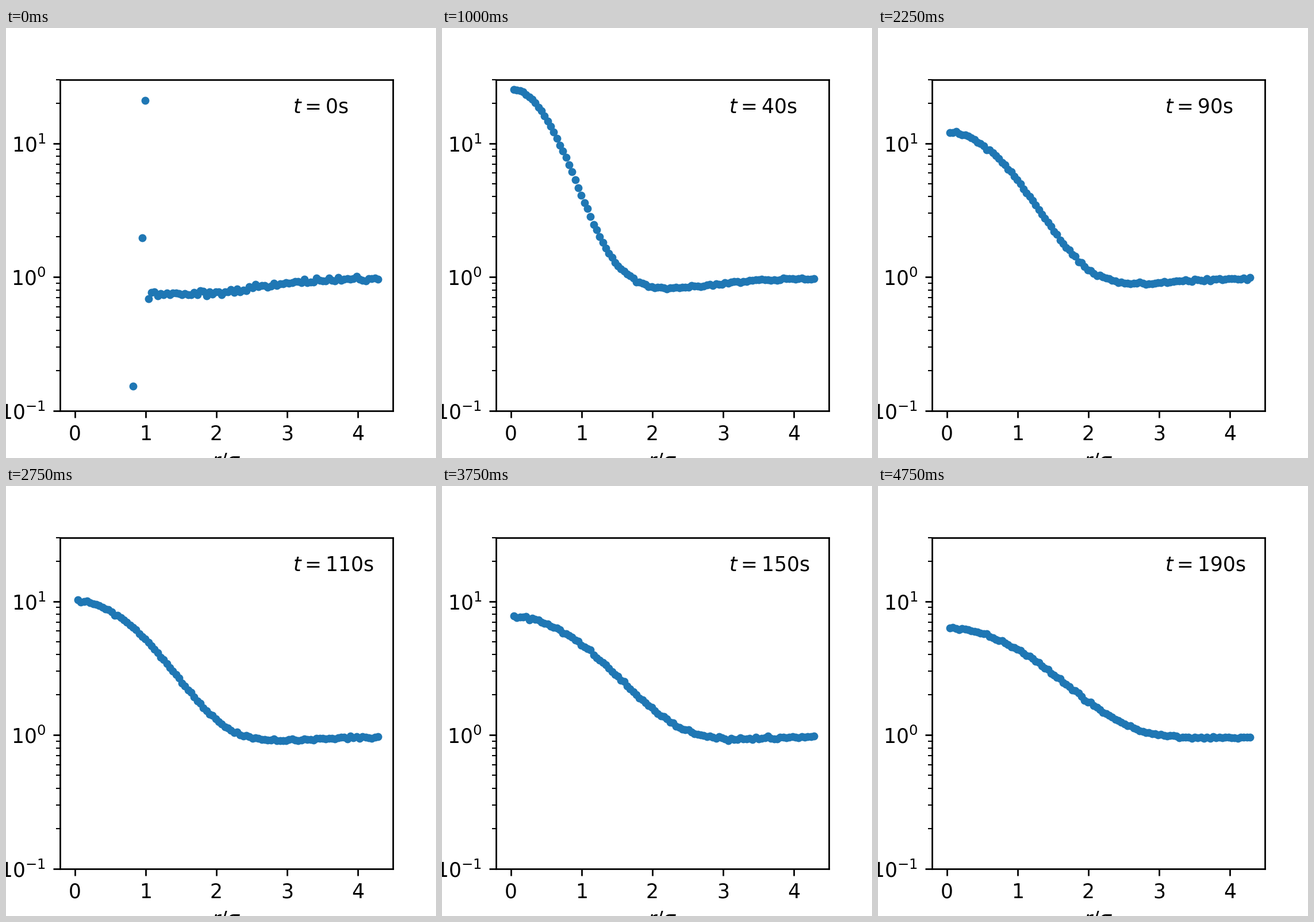
A matplotlib script for the animation above (5 s loop, 748x748 px).

```python
import numpy as np
import matplotlib.pyplot as plt
from matplotlib.animation import FuncAnimation

SIZE = 748
FRAMES, STEP_MS, STEP_S = 20, 250, 10
R_MAX, SHOWN = 4.284, 99
DR = R_MAX / SHOWN
SPREAD = 0.0114   # growth of the squared width per second
PEAK = 1000       # central height times seconds

r = DR * np.arange(1, 181)


def structure():
    """Pair density at the start: empty core, contact spike, flat far field."""
    g = 0.98 - 0.22 * np.exp(-((r - 1) / 2) ** 4)
    g[:23] = 0
    g[[18, 21, 22, 23]] = 0.152, 1.96, 20.9, 0.69
    return g


g0 = structure()


def density(t):
    """Spreading self part plus the start structure blurred by diffusion."""
    if t == 0:
        return np.where(g0 > 0, g0, np.nan)[:SHOWN]
    w = SPREAD * t
    x = r[:SHOWN, None]
    kernel = 2 * r / w * np.exp(-(x ** 2 + r ** 2) / w) * np.i0(2 * x * r / w)
    return PEAK / t * np.exp(-r[:SHOWN] ** 2 / w) + kernel @ g0 * DR


def jitter(t):
    noise = np.random.default_rng(t + 5).normal(0, 1, SHOWN)
    if t == 0:
        noise[:24] = 0
    return 10 ** ((0.005 if t else 0.012) * noise)


fig, ax = plt.subplots(figsize=(3, 3), dpi=SIZE / 3)
ax.set_yscale("log")
ax.set_xlim(-0.05 * R_MAX, 1.05 * R_MAX)
ax.set_ylim(0.1, 30)
ax.set_xticks(range(5))
ax.set_xlabel(r"$r/\sigma$")
dots, = ax.plot([], [], ".", color="#1f77b4")
clock = ax.text(0.7, 0.9, "", transform=ax.transAxes)


def update(n):
    t = n * STEP_S
    dots.set_data(r[:SHOWN], density(t) * jitter(t))
    clock.set_text(f"$t={t}$s")
    return dots, clock


anim = FuncAnimation(fig, update, frames=FRAMES, interval=STEP_MS,
                     init_func=lambda: update(0), repeat=True, repeat_delay=0)
plt.show()
```
